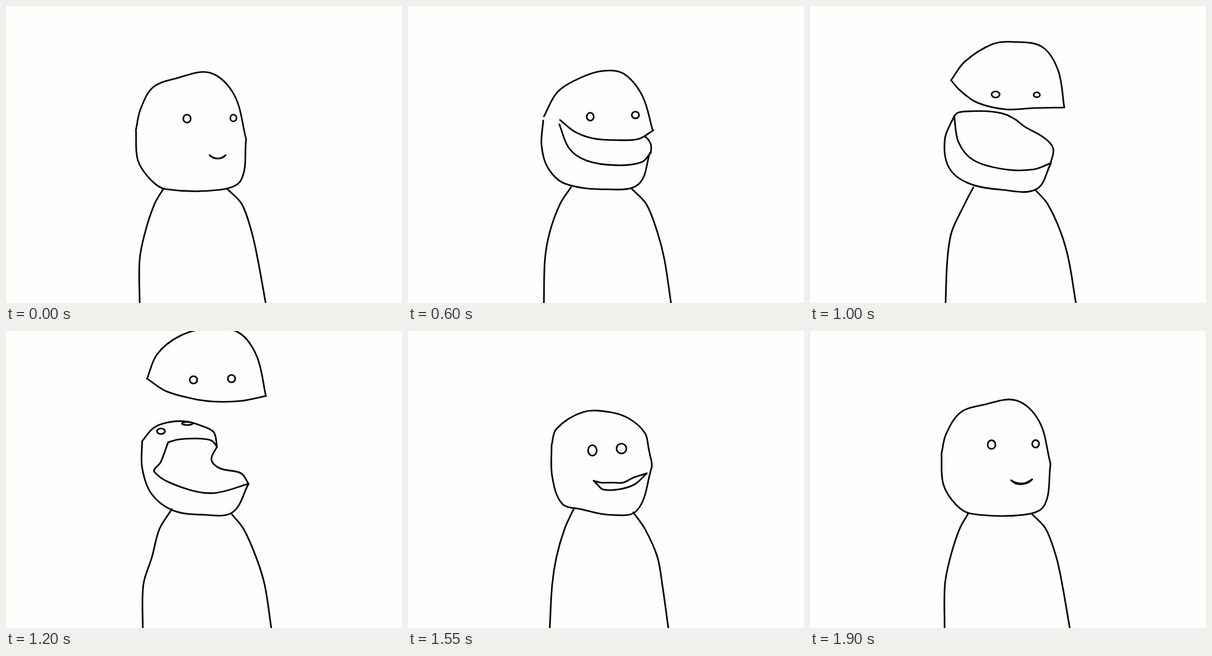
An HTML page with a canvas for the animation above (1950 ms loop, 640 by 480 pixels).

```html
<!DOCTYPE html>
<html lang="en">
<head>
<meta charset="utf-8">
<title>Head swap</title>
<style>
html, body { margin: 0; width: 100%; height: 100%; overflow: hidden; background: #fefefc; }
canvas { display: block; }
</style>
</head>
<body>
<canvas id="stage" width="640" height="480"></canvas>
<script>
const LOOP = 1950, STEP = 50, LIFT_OFF = 1200, GONE = 1450, PAPER = '#fefefc';
const ctx = document.getElementById('stage').getContext('2d');

// Each part has a few key poses by time; a pose is a flat list of x, y pairs.
const track = poses => Object.entries(poses).map(([t, pose]) => ({ t: +t, pose }));
const dot = (x, y) => Array(5).fill([x, y]).flat();

// A shoulder line: its top point, then x at four fixed heights.
const arm = poses => track(poses).map(({ t, pose: [x, y, ...xs] }) => (
  { t, pose: [x, y, ...xs.flatMap((v, i) => [v, [320, 365, 410, 482][i]])] }
));

// Poses shared by the first and the last drawing.
const SKULL = [210,200, 217,168, 237,132, 275,117, 330,108, 369,144, 388,215];
const JAW = [210,200, 213,249, 234,281, 258,296, 346,297, 380,281, 388,215];
const SMILE = [329,241, 333,244, 338,246, 346,246, 351,244, 355,241];
const ARM_LEFT = [254,296, 240, 225, 216, 216];
const ARM_RIGHT = [358,296, 381, 397, 407, 420];
const EYE_LEFT = [292.5,182, 6,6.5];
const EYE_RIGHT = [367.5,181, 5,5.5];

const armLeft = arm({
  0: ARM_LEFT,
  350: [263,293, 244, 229, 220, 219],
  1000: [264,293, 250, 229, 222, 219],
  1200: [268,288, 248, 236, 222, 221],
  1550: [268,287, 253, 240, 233, 229],
  1950: ARM_LEFT
});
const armRight = arm({
  0: ARM_RIGHT,
  350: [360,294, 385, 401, 413, 423],
  1000: [364,297, 384, 405, 418, 430],
  1200: [364,295, 384, 404, 418, 429],
  1550: [364,293, 383, 403, 411, 421],
  1950: ARM_RIGHT
});
const jaw = track({
  0: JAW,
  350: [213,205, 217,248, 234,277, 258,292, 350,296, 380,280, 391,215],
  800: [222,170, 214,205, 218,248, 252,283, 300,297, 367,294, 390,255],
  1000: [233,178, 218,215, 224,260, 255,286, 310,297, 366,296, 389,255],
  1200: [220,178, 220,221, 235,263, 270,290, 320,297, 366,293, 392,247],
  1550: [232,185, 233,235, 249,279, 280,288, 325,297, 370,290, 394,220],
  1950: JAW
});
const lowerLip = track({
  0: SMILE,
  350: [274,219, 293,246, 325,255, 360,250, 385,239, 394,215],
  800: [222,170, 235,217, 260,247, 318,264, 372,264, 390,255],
  1000: [233,178, 240,220, 264,249, 315,264, 362,264, 389,254],
  1200: [262,180, 250,212, 240,228, 285,253, 335,262, 392,247],
  1550: [300,242, 306,248, 315,256, 340,256, 366,248, 386,230],
  1950: SMILE
});

// The lid that opens and flies away.
const cap = track({
  0: SKULL,
  350: [213,205, 222,164, 243,134, 298,110, 332,108, 372,140, 391,215],
  800: [224,157, 257,121, 300,104, 327,100, 361,109, 384,150, 398,190],
  1000: [228,120, 250,90, 294,62, 328,58, 375,66, 401,104, 411,164],
  1200: [228,77, 244,38, 279,9, 325,-4, 375,2, 405,40, 420,105]
});
const capEdge = track({
  0: SMILE,
  350: [274,219, 293,225, 318,228, 350,229, 375,227, 394,215],
  800: [224,157, 250,186, 285,202, 325,206, 372,204, 398,190],
  1000: [228,120, 242,136, 270,156, 316,167, 360,165, 411,164],
  1200: [228,77, 258,97, 300,109, 335,114, 380,113, 420,105]
});

// The far rim of the open mouth becomes the next skull.
const skull = track({
  800: [222,170, 234,171, 260,172, 285,176, 315,183, 345,194, 368,204],
  1000: [233,178, 240,172, 262,170, 285,170, 303,172, 318,176, 333,184],
  1200: [220,178, 238,157, 260,148, 290,146, 318,154, 336,164, 341,187],
  1550: [232,185, 240,158, 283,131, 326,131, 358,142, 383,165, 389,190],
  1950: SKULL
});
const throat = track({
  350: dot(394, 215),
  800: [368,204, 377,210, 385,219, 391,233, 390,255],
  1000: [333,184, 347,195, 377,212, 393,230, 389,254],
  1200: [341,187, 332,208, 346,222, 380,230, 392,247],
  1550: [389,190, 391,200, 393,208, 394,214, 394,220],
  1950: dot(388, 215)
});
const palate = track({
  1000: [233,178, 240,172, 262,170, 285,170, 303,172, 333,184],
  1200: [262,180, 275,176, 295,174, 315,174, 332,177, 341,187],
  1550: [300,242, 312,245, 330,245, 348,245, 362,238, 386,230],
  1950: SMILE
});

// Eyes: centre and radii.
const capEyes = [
  { 0: EYE_LEFT, 350: [295,182, 6,6.5], 800: [294.5,176.5, 5,6], 1000: [300,143, 6.5,5], 1200: [303,79, 6,6] },
  { 0: EYE_RIGHT, 350: [370,181, 6.5,5.5], 800: [366.5,172, 5,5], 1000: [366.5,143.5, 5,4], 1200: [364.5,77, 6,6] }
].map(track);
const newEyes = [
  { 1200: [250.5,162, 6.5,4.5], 1550: [298,193, 7,8.5], 1950: EYE_LEFT },
  { 1200: [293,149.5, 8.5,2.5], 1550: [345,190, 8,8], 1950: EYE_RIGHT }
].map(track);

// Blended pose with a slight hand wobble halfway between keys.
function poseAt(keys, t) {
  const next = keys.findIndex(k => k.t > t);
  if (next < 0) return keys[keys.length - 1].pose;
  if (next === 0) return keys[0].pose;
  const a = keys[next - 1], b = keys[next], f = (t - a.t) / (b.t - a.t);
  return a.pose.map((v, i) => {
    const mid = v + (b.pose[i] - v) * f;
    return mid + 0.6 * Math.sin(Math.PI * f) * Math.sin(mid / 9 + t * 1.7);
  });
}

const toPoints = pose => pose.flatMap((v, i) => i % 2 ? [] : [[v, pose[i + 1]]]);

// Smooth curve through the points, continuing the current path.
function curve(pts) {
  const slope = pts.map((p, i) => {
    const a = pts[Math.max(i - 1, 0)], b = pts[Math.min(i + 1, pts.length - 1)];
    const dx = b[0] - a[0], dy = b[1] - a[1], d = Math.hypot(dx, dy) || 1;
    return [dx / d, dy / d];
  });
  ctx.lineTo(...pts[0]);
  for (let i = 1; i < pts.length; i++) {
    const [x0, y0] = pts[i - 1], [x1, y1] = pts[i];
    const h = Math.hypot(x1 - x0, y1 - y0) / 3;
    ctx.bezierCurveTo(
      x0 + slope[i - 1][0] * h, y0 + slope[i - 1][1] * h,
      x1 - slope[i][0] * h, y1 - slope[i][1] * h, x1, y1);
  }
}

function draw(t) {
  const line = keys => {
    ctx.beginPath();
    curve(toPoints(poseAt(keys, t)));
    ctx.stroke();
  };
  const eye = keys => {
    const [x, y, rx, ry] = poseAt(keys, t);
    ctx.beginPath();
    ctx.ellipse(x, y, rx, ry, 0, 0, Math.PI * 2);
    ctx.stroke();
  };

  ctx.fillStyle = PAPER;
  ctx.fillRect(0, 0, 640, 480);
  ctx.strokeStyle = '#000';
  ctx.lineWidth = 2.6;
  ctx.lineCap = ctx.lineJoin = 'round';

  [armLeft, armRight, jaw, lowerLip].forEach(line);
  if (t > 350) line(throat);
  if (t >= 800) line(skull);
  if (t > 1000) line(palate);
  if (t >= LIFT_OFF) newEyes.forEach(eye);

  if (t < GONE) {
    const lift = Math.max(0, t - LIFT_OFF) / (GONE - LIFT_OFF);
    ctx.save();
    ctx.translate(18 * lift, -125 * lift);
    ctx.beginPath();
    curve(toPoints(poseAt(cap, t)));
    curve(toPoints(poseAt(capEdge, t)).reverse());
    ctx.fill();
    [cap, capEdge].forEach(line);
    capEyes.forEach(eye);
    ctx.restore();
  }
}

const start = performance.now();
let shown = -1;
function tick() {
  const t = Math.floor((performance.now() - start) % LOOP / STEP) * STEP;
  if (t !== shown) draw(shown = t);
  requestAnimationFrame(tick);
}
tick();
</script>
</body>
</html>
```
